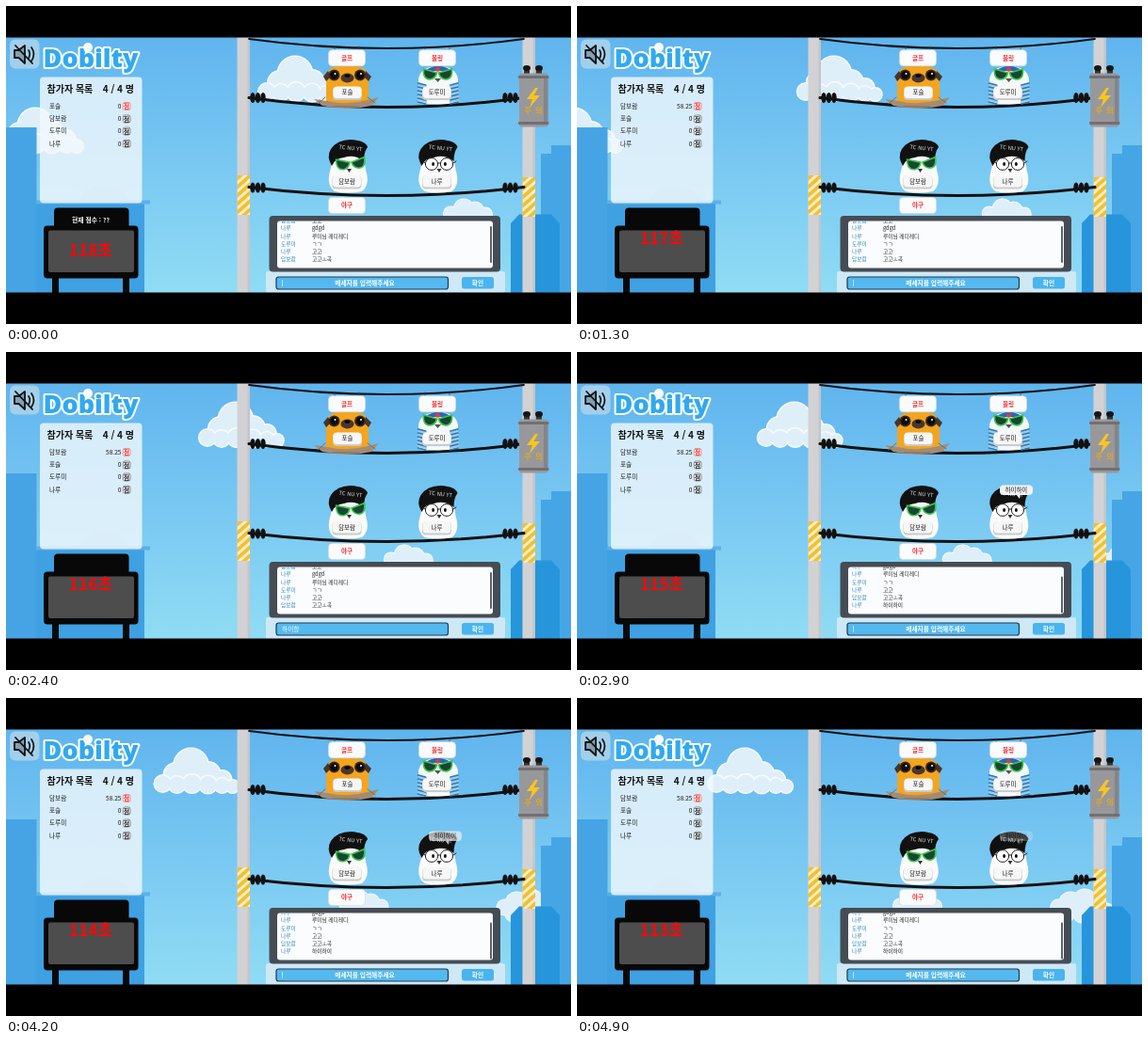
Write an HTML page that moves like this. It is 600 by 338 pixels and loops after 5000 ms.

```html
<!DOCTYPE html>
<html lang="ko">
<head>
<meta charset="utf-8">
<title>Game room</title>
<style>
html, body { margin: 0; width: 100%; height: 100%; overflow: hidden; background: #000; }
svg { display: block; width: 100vw; height: 100vh; }
svg svg { width: auto; height: auto; }
text { font-family: "Noto Sans CJK KR", "Noto Sans CJK", "Noto Sans", sans-serif; white-space: pre; }
</style>
</head>
<body>
<svg id="stage" viewBox="0 0 600 338" preserveAspectRatio="none"></svg>
<script>
const LOOP = 5000, DRIFT = 26.3;
const SEND = 2500, SCORE = 1250;
const players = { a: '포슬', b: '담보람', c: '도루미', d: '나루' };

const rect = (x, y, w, h, fill, r = 0, more = '') =>
  `<rect x="${x}" y="${y}" width="${w}" height="${h}" rx="${r}" fill="${fill}" ${more}/>`;
const oval = (x, y, rx, ry, fill, more = '') =>
  `<ellipse cx="${x}" cy="${y}" rx="${rx}" ry="${ry}" fill="${fill}" ${more}/>`;
const path = (d, fill, more = '') => `<path d="${d}" fill="${fill}" ${more}/>`;
const line = (d, color, width) =>
  path(d, 'none', `stroke="${color}" stroke-width="${width}" stroke-linecap="round" stroke-linejoin="round"`);
const clip = (id, x, y, w, h, body) =>
  `<clipPath id="${id}">${rect(x, y, w, h, '#000')}</clipPath><g clip-path="url(#${id})">${body}</g>`;
// y is the middle of the line of text
const label = (x, y, s, size, fill, anchor = 'middle', weight = 500, id = '') =>
  `<text ${id && `id="${id}"`} x="${x}" y="${y + size * 0.36}" font-size="${size}" fill="${fill}" text-anchor="${anchor}" font-weight="${weight}">${s}</text>`;

// each row of puffs has its own white rim
function cloud(id, rows, rim) {
  const layer = (row, fill, inset) => row.map(([x, y, r]) => oval(x, y, r - inset, r - inset, fill)).join('');
  return `<g id="${id}">${rows.map(row => layer(row, '#fbfdff', 0) + layer(row, '#dfeffa', rim)).join('')}</g>`;
}
const bigCloud = [
  [[40, 20, 19.5], [24, 30, 14], [58, 29, 14], [73, 35, 11]],
  [[10, 39, 10], [25, 40, 10], [41, 39, 11], [58, 40, 10.5], [73, 41, 9], [84, 42, 8]]];
const smallCloud = [[[8, 16, 8], [22, 11, 11], [34, 13, 10], [45, 17, 8], [16, 18, 7], [28, 19, 8]]];
const sideCloud = [[[9, 20, 9], [22, 16, 13], [37, 13, 13], [50, 18, 11], [60, 23, 8], [18, 27, 9], [34, 27, 10], [48, 28, 8]]];

function city() {
  return oval(104, 218, 30, 28, '#7cc0ec') +
    rect(0, 129, 32.5, 176, '#46a4e4') +
    rect(32, 210, 115, 95, '#3fa0e2') + rect(32, 206.5, 121, 4, '#5db0e8') +
    path('M568 305V157H579V148H600V305Z', '#46a6e5') +
    path('M536 305V231L545 221.500H579L588 231V305Z', '#2695dc');
}

function pole(x, top) {
  let bands = '';
  for (let y = top - 4; y < top + 60; y += 9)
    bands += path(`M${x} ${y + 10}l13.500 -12v4l-13.500 12z`, '#fbeec6');
  return rect(x, 33, 13.5, 272, '#d2d2d4') + rect(x + 11, 33, 2.5, 272, '#c4c5c8') +
    clip('band' + top, x, top, 13.5, 42, rect(x, top, 13.5, 42, '#f3bf2f') + bands);
}

function wire(y, sag, width) {
  return line(`M258 ${y}Q404 ${y + sag * 2} 550 ${y}`, '#111', width);
}
function insulators(y) {
  return [262, 267.5, 273, 530, 535.5, 541].map(x => oval(x, y + 0.5, 2.7, 5.6, '#111')).join('');
}

function transformer() {
  return [553, 566].map(x => rect(x - 3, 65, 6, 8, '#333') + oval(x, 66, 4, 3, '#151515')).join('') +
    rect(545, 71.5, 30.5, 57, '#98989b', 2) + rect(571, 75, 4.5, 50, '#858589') +
    rect(544, 74, 32.5, 3, '#707074', 1) + rect(544, 123, 32.5, 3, '#707074', 1) +
    path('M562 87L553 99H559L556 108L567 95H560.500L565 87Z', '#f9c51f') +
    label(560, 111, '주  의', 8, '#e0a922', 'middle', 700);
}

const sign = (x, y, s) => rect(x - 19.5, y - 8.5, 39, 17, '#fafbfc', 4, 'stroke="#d4dce2" stroke-width=".7"') +
  label(x, y, s, 6.6, '#f03030', 'middle', 700);
const tag = (x, y, s) => rect(x - 15.5, y - 6, 31, 14, '#c9cbcd', 4) +
  rect(x - 15, y - 6.5, 30, 12.5, '#f7f7f7', 4) + label(x, y, s, 6.4, '#151515');
const hooks = x => line(`M${x - 13} 43v4M${x + 13} 43v4`, '#444', 0.7);

function pug() {
  const eye = x => oval(x, 73.5, 6, 6, '#392a20') + oval(x, 73.5, 4.2, 4.2, '#0b0b0b') + oval(x + 1, 72, 1, 1, '#fff');
  return path('M340 104V79Q340 64 354 64H370Q385 64 385 79V104Z', '#f3a51f') +
    path('M342 69L337 75L340 80L345 75M382 69L388 75L385 80L380 75', '#493428') +
    eye(348.5) + eye(376) + oval(362.5, 76.500, 7, 5, '#4a362b') + oval(362.5, 74, 3, 1.8, '#080808') +
    path('M327 99L341 101Q362 106 384 100L396 97L388 106Q362 112 336 106Z', '#a58b74') +
    line('M331 104l8 -7M392 103l-8 -6M347 107h28', '#86694f', 1) + tag(362.5, 92, players.a);
}

function shades(x, y, tilt) {
  const lens = s => path(`M${x + s} ${y - 1}L${x + s * 15} ${y - 5}Q${x + s * 16} ${y + 6} ${x + s * 8} ${y + 6}Q${x + s * 2} ${y + 5} ${x + s} ${y - 1}Z`,
    '#1d4238', 'stroke="#35c745" stroke-width="1.6"');
  return `<g transform="rotate(${tilt} ${x} ${y})">${lens(-1)}${lens(1)}</g>`;
}

function stripedBird() {
  let stripes = '';
  for (let y = 82; y < 104; y += 4) stripes += line(`M437.5 ${y}l8 2M480 ${y}l-8 2`, '#2b7cb6', 1.6);
  return path('M438 102V78Q440 64 459 64Q478 64 480 78V102Q459 107 438 102Z', '#f5f8fa') +
    path('M438 81L447 84V103L437 101ZM480 81L471 84V103L481 101Z', '#9ecbe8') + stripes +
    path('M445 69Q459 58 473 69Z', '#2f67b2') + oval(458.5, 67.5, 2.6, 2.2, '#dd3d43') +
    shades(458.5, 72, 0) + path('M455 77h7l-3.500 4z', '#555') + tag(457.5, 92, players.c);
}

function cappedBird(x, glasses, name) {
  const at = (dx, y) => `${x + dx} ${y}`;
  const body = path(`M${at(-17, 172)}Q${at(-15, 157)} ${at(2, 157)}Q${at(19, 157)} ${at(20, 174)}Q${at(25, 190)} ${at(16, 197)}Q${at(1, 200)} ${at(-13, 197)}Q${at(-23, 190)} ${at(-17, 172)}Z`, '#fbfbfb');
  const cap = path(`M${at(-16, 170)}Q${at(-22, 160)} ${at(-17, 152)}Q${at(-10, 142)} ${at(4, 142)}Q${at(20, 143)} ${at(22, 150)}Q${at(18, 155)} ${at(18, 165)}Q${at(8, 157)} ${at(-3, 161)}Q${at(-13, 162)} ${at(-16, 170)}Z`, '#111');
  return body + cap +
    `<g transform="rotate(6 ${at(4, 151)})">${label(x + 4, 151, 'TC NU YT', 5.8, '#ddd', 'middle', 400)}</g>` +
    glasses + path(`M${at(0, 173)}h5l-2.500 4z`, '#333') + tag(x, 186.5, name);
}
const roundGlasses = x => [-8, 8].map(d =>
  oval(x + d, 168, 6.6, 6.4, '#fff', 'stroke="#222" stroke-width="1"') + oval(x + d * 0.8, 168, 1.5, 1.9, '#111')).join('') +
  line(`M${x - 1.4} 167h2.800M${x - 15} 167l-3 -2M${x + 15} 167l3 -2`, '#222', 1);

function header() {
  return rect(4, 35.5, 31.5, 31, '#a3cfea', 6) +
    path('M9 47H13.500L20 42V61L13.500 55H9Z', '#7f9fb2', 'stroke="#111" stroke-width="1.8" stroke-linejoin="round"') +
    line('M24 47Q26.500 51 24 55.500M27 44Q32 51 27 58.500', '#111', 1.7) + line('M10 42L28 61', '#111', 1.8) +
    `<text x="90" y="65" font-size="27" text-anchor="middle" style="font-family:'Open Sans',sans-serif" font-weight="800" fill="#32a9ed" stroke="#fff" stroke-width="4" stroke-linejoin="round" paint-order="stroke">Dobilty</text>` +
    oval(87, 44, 5, 5, '#f7fafc');
}

const scoreY = [106.5, 120, 133, 146.3];
function scorePanel() {
  const rows = scoreY.map((y, i) => {
    const color = i ? '#222' : '#ee2f2f';
    return label(46, y, '', 6.6, '#151515', 'start', 500, 'name' + i) +
      label(122.5, y, '', 6.6, '#151515', 'end', 500, 'score' + i) +
      rect(124.3, y - 4, 7.7, 8, '#fff', 2, `stroke="${color}" stroke-width=".5"`) +
      label(128.1, y, '점', 7, color, 'middle', 700);
  }).join('');
  return rect(36, 75.5, 108.5, 134, '#f3f9fd', 4, 'opacity=".8"') +
    label(43.5, 88, '참가자 목록', 10, '#101010', 'start', 700) +
    label(136, 88, '4 / 4 명', 10, '#101010', 'end', 700) + rows;
}

function board() {
  return rect(49, 285, 7, 20, '#090909') + rect(124, 285, 7, 20, '#090909') +
    rect(51, 214.5, 79.5, 30, '#080808', 4) + rect(40, 233.5, 100.5, 56, '#080808', 4) +
    rect(45, 238.5, 91, 44.5, '#4d4d4e', 2) +
    label(90, 227.5, '현재 점수 : ??', 6.8, '#fff', 'middle', 700, 'points') +
    label(90, 260, '', 17.3, '#fb0808', 'middle', 900, 'clock');
}

const messages = [[players.b, '고고'], [players.d, 'gdgd'], [players.d, '루미님 레디레디'], [players.c, 'ㄱㄱ'],
  [players.d, '고고'], [players.b, '고고ㅗ곡'], [players.d, '하이하이']];
function chat() {
  const rows = messages.map(([who, s], i) => {
    const y = 228 + i * 8.25;
    return `<g id="msg${i}">${label(292, y, who, 5.7, '#2b86bc', 'start')}${label(325, y, s, 5.7, '#202020', 'start')}</g>`;
  }).join('');
  return rect(276, 282, 254, 23, '#cfe8f6', 2) +
    rect(279.5, 223, 245.5, 59.5, '#454c54', 4) +
    rect(288, 228.5, 229, 50, '#fbfcfd', 3) +
    clip('logBox', 288, 228.5, 226, 49.5, `<g id="log">${rows}</g>`) +
    rect(514, 234, 2, 39, '#5c6268', 1, 'id="bar"') +
    rect(287, 288, 182.5, 13, '#54b9ef', 2.5, 'stroke="#1c3a52" stroke-width="1.2"') +
    label(381, 294.5, '메세지를 입력해주세요', 6.7, '#fff', 'middle', 700, 'hint') +
    label(293, 294.5, '', 6.7, '#fff', 'start', 500, 'typed') +
    rect(293, 291, 0.7, 7, '#e7f6ff', 0, 'id="caret"') +
    rect(484, 288, 34, 12.5, '#49b4ee', 2.5) + label(501, 294.3, '확인', 6.7, '#fff', 'middle', 700);
}

const bubble = `<g id="bubble">${rect(449, 141.5, 35, 10.5, '#f1f2f3', 4)}${path('M466 151l4 5l1 -5z', '#f1f2f3')}${label(466.5, 147, '하이하이', 6.4, '#1a1a1a')}</g>`;

const stage = document.getElementById('stage');
stage.innerHTML = `<defs><linearGradient id="sky" x1="0" y1="0" x2="0" y2="1">
  <stop offset="0" stop-color="#60b5ee"/><stop offset=".5" stop-color="#79c8f2"/><stop offset="1" stop-color="#90dcf4"/>
  </linearGradient></defs>` + rect(0, 33, 600, 272, 'url(#sky)') +
  cloud('west', bigCloud, 1.3) + cloud('main', bigCloud, 1.3) + cloud('mid', smallCloud, 0.8) + cloud('east', sideCloud, 0.8) +
  city() + pole(245.5, 180) + pole(548.5, 182) +
  wire(35, 10, 1.8) + wire(97.5, 10, 3) + wire(192.5, 9, 3) + insulators(97) + insulators(192.5) + transformer() +
  pug() + stripedBird() + cappedBird(362, shades(366, 167, -5), players.b) + cappedBird(457.5, roundGlasses(460), players.d) +
  hooks(362) + hooks(458) + sign(362, 55.2, '골프') + sign(458, 55.2, '볼링') + sign(362, 212, '야구') +
  bubble + header() + scorePanel() + board() + chat() +
  rect(0, 0, 600, 33.5, '#000') + rect(0, 304.5, 600, 33.5, '#000');

const $ = id => document.getElementById(id);
const show = (id, on) => $(id).setAttribute('visibility', on ? 'visible' : 'hidden');
const move = (id, x, y) => $(id).setAttribute('transform', `translate(${x} ${y})`);
const write = (id, s) => { if ($(id).textContent !== s) $(id).textContent = s; };
const keys = ['', 'ㅎ', '하', '항', '하이', '하잏', '하이하', '하이항', '하이하이'];

function draw(t) {
  const shift = -DRIFT * t / 1000;
  move('main', 267 + shift, 52);
  move('west', -9 + shift, 107);
  move('mid', 464 + shift, 204.5);
  move('east', 631 + shift, 202.5);

  const scored = t >= SCORE, sent = t >= SEND;
  const order = scored ? 'bacd' : 'abcd';
  [...order].forEach((k, i) => {
    write('name' + i, players[k]);
    write('score' + i, scored && !i ? '58.25' : '0');
  });
  show('points', !scored);
  write('clock', 118 - Math.floor((t + 300) / 1000) + '초');
  move('clock', 0, scored ? -13 : 0);

  const count = sent ? 0 : Math.max(0, Math.min(8, Math.floor((t - 1300) / 150)));
  write('typed', keys[count]);
  show('hint', !count);
  show('caret', !count);
  show('msg6', sent);
  move('log', 0, sent ? -8.25 : 0);
  move('bar', 0, sent ? 4.5 : 0);
  show('bubble', sent);
  $('bubble').setAttribute('opacity', Math.max(0, Math.min(1, 1 - (t - 3700) / 1600)));
}

const start = performance.now();
function frame() {
  draw((performance.now() - start) % LOOP);
  requestAnimationFrame(frame);
}
draw(0);
requestAnimationFrame(frame);
</script>
</body>
</html>
```
